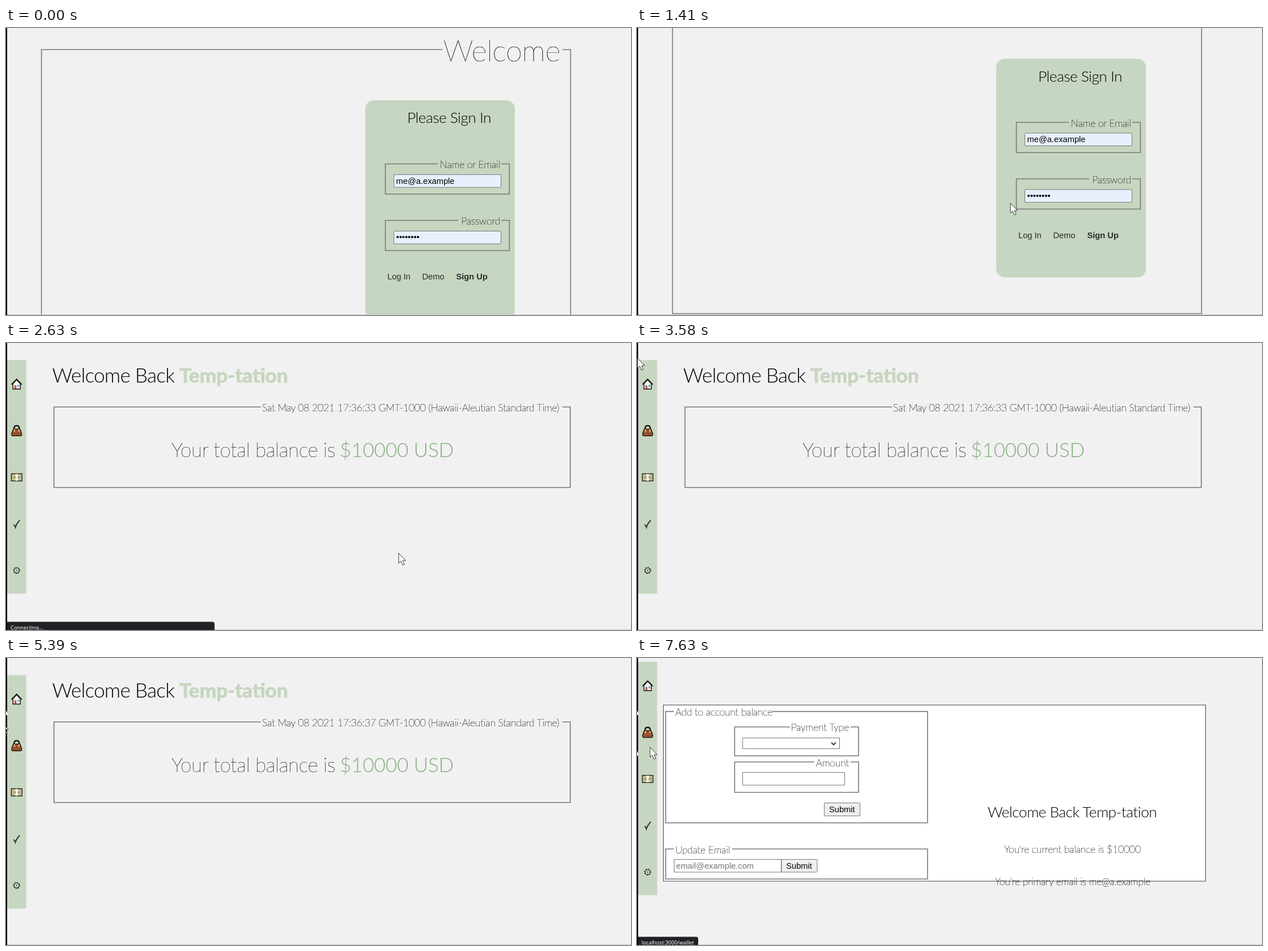
Write an HTML page that moves like this. It is 1103x508 px and loops after 7690 ms.

```html
<!DOCTYPE html>
<html lang="en">
<head>
<meta charset="utf-8">
<title>Account demo</title>
<style>
  html, body { margin: 0; width: 100%; height: 100%; overflow: hidden; background: #f1f1f1; }
  svg { display: block; width: 1103px; height: 508px; }
  .lato { font-family: Lato, sans-serif; }
  .thin { font-weight: 100; letter-spacing: -.0117em; stroke: #000; stroke-width: .2; }
  .light { font-weight: 300; letter-spacing: -.021em; }
  .amount { letter-spacing: -.006em; }
  .ui { font: 14.67px "Liberation Sans", Arial, sans-serif; }
  .bold { font-weight: 700; }
  .status { font: 9.3px "Noto Sans", sans-serif; fill: #fff; }
  .line { fill: none; stroke: #777; stroke-width: 1.6; }
  .control { stroke: #767676; stroke-width: 1; }
</style>
</head>
<body>
<svg id="stage" viewBox="0 0 1103 508" xmlns="http://www.w3.org/2000/svg"></svg>
<script>
const LOOP = 7690, HOME_AT = 2430, RELOAD_AT = 4650, WALLET_AT = 7490;
const EMAIL = "me@a.example";
const NICKNAME = "Temp-tation";

const text = (x, y, str, cls, size, extra = "") =>
  `<text x="${x}" y="${y}" class="${cls}" ${size ? `font-size="${size}"` : ""} ${extra}>${str}</text>`;
const thin = (x, y, str, size = 17.6, anchor = "start") =>
  text(x, y, str, "lato thin", size, `text-anchor="${anchor}"`);
const light = (x, y, str, size, extra) => text(x, y, str, "lato light", size, extra);
const ui = (x, y, str, extra) => text(x, y, str, "ui", 0, extra);
const rect = (x, y, w, h, fill, extra = "") =>
  `<rect x="${x}" y="${y}" width="${w}" height="${h}" fill="${fill}" ${extra}/>`;
const control = (x, y, w, h, fill, r = 1.5) =>
  rect(x + .5, y + .5, w - 1, h - 1, fill, `rx="${r}" class="control"`);
// Box whose top edge is open between gapLeft and gapRight
const fieldset = (left, top, right, bottom, gapLeft, gapRight) =>
  `<path class="line" d="M${gapLeft} ${top}H${left}V${bottom}H${right}V${top}H${gapRight}"/>`;
const group = (id, body, extra = "") => `<g id="${id}" ${extra}>${body}</g>`;

const loginPage = group("login",
  fieldset(62.6, 38.3, 996.4, 579, 770, 982) +
  thin(978, 59, "Welcome", 52.8, "end") +
  rect(634, 128, 264, 387, "#c6d6c0", 'rx="15"') +
  light(782, 168, "Please Sign In", 26.4, 'text-anchor="middle"') +
  fieldset(669.5, 240.5, 888.4, 294, 762, 874) +
  thin(872, 248, "Name or Email", 17.6, "end") +
  control(684, 259, 190, 23.5, "#e8f0fe") +
  ui(688.6, 275.5, EMAIL) +
  fieldset(669.5, 340.5, 888.4, 394, 798, 874) +
  thin(872, 348, "Password", 17.6, "end") +
  control(684, 359, 190, 23.5, "#e8f0fe") +
  ui(688.6, 375.3, "•".repeat(8)) +
  ui(673, 445, "Log In", 'fill="#2a2a2a"') +
  ui(734.5, 445, "Demo", 'fill="#2a2a2a"') +
  text(794.5, 445, "Sign Up", "ui bold", 0, 'fill="#2a2a2a"'));

const homePage = group("home",
  light(81.5, 70, "Welcome Back", 35.2) +
  text(306, 70, NICKNAME, "lato bold", 35.2,
    'fill="#c6d6c0" stroke="#c6d6c0" stroke-linejoin="round"') +
  fieldset(84.6, 113.3, 995.8, 255.8, 450, 982) +
  thin(452, 121, '<tspan id="clock"></tspan>') +
  thin(292, 202, "Your total balance is", 35.2) +
  text(589, 202, "$10000 USD", "lato light amount", 35.2, 'fill="#86ad80"'));

const walletPage = group("wallet",
  rect(46.5, 83.2, 957, 311.8, "#fff", 'stroke="#444"') +
  fieldset(50.6, 94.6, 512.7, 291.7, 65, 239) +
  thin(67.5, 101.5, "Add to account balance") +
  fieldset(172.3, 122, 391, 173.3, 270, 377) +
  thin(374, 129, "Payment Type", 17.6, "end") +
  control(186, 141, 172, 20, "#fff", 0) +
  `<path d="M343 149.5l4 4 4-4" fill="none" stroke="#111" stroke-width="1.6"/>` +
  fieldset(172.3, 184, 391, 237.7, 313, 377) +
  thin(374, 191.5, "Amount", 17.6, "end") +
  control(186, 202, 181, 23.5, "#fff", 0) +
  control(330, 256, 64, 24, "#efefef") + ui(339, 273, "Submit") +
  fieldset(50.6, 338, 512.7, 391.3, 65, 168) +
  thin(67.5, 345.5, "Update Email") +
  control(65, 356, 190, 23.5, "#fff", 0) +
  ui(69, 373, "email@example.com", 'fill="#757575"') +
  control(254.5, 356, 64, 23.5, "#efefef") + ui(263.3, 373, "Submit") +
  light(768, 282, `Welcome Back ${NICKNAME}`, 26.4, 'text-anchor="middle"') +
  thin(768.5, 345, "You're current balance is $10000", 17.6, "middle") +
  thin(769, 401.5, `You're primary email is ${EMAIL}`, 17.6, "middle"));

// Icons are centred on their own origin
const icons = [
  `<path d="M-6.5-1V8.5H6.5V-1L0-8Z" fill="#f6f6f6" stroke="#111" stroke-width="1.4"/>
   <path d="M-9 .5L0-8.7 9 .5" fill="none" stroke="#1b1414" stroke-width="2"/>
   ${rect(-4, 2, 3.5, 6, "#d0523c")}${rect(1.3, 1, 3.5, 3.5, "#55b4e6")}`,
  `<path d="M-4.5-1V-5Q-4-9 0-9T4.5-5V-1" fill="none" stroke="#160c08" stroke-width="2.4"/>
   <path d="M-6-3H6L9 5.5Q9 9 6 9H-6Q-9 9-9 5.5Z" fill="#96502f" stroke="#160c08" stroke-width="1.3"/>
   <path d="M-4-3V2M4-3V2" stroke="#e9b574" stroke-width="2.2"/>`,
  `${rect(-9.3, -6.3, 18.6, 12.6, "#efe5b4", 'stroke="#111" stroke-width="1.4"')}
   ${rect(-7, -4, 14, 8, "none", 'stroke="#8c8861" stroke-width=".8"')}
   ${rect(-2, -6, 4, 12, "#faf8e9")}
   <circle cx="-4" r="1.8" fill="none" stroke="#555"/><circle cx="4" r="1.8" fill="none" stroke="#555"/>`,
  `<path d="M-5.5 1.5Q-3 2.5-2.2 6 0-1 5.5-6.5" fill="none" stroke="#333" stroke-width="2"/>`,
  `<circle r="4.5" fill="none" stroke="#222" stroke-width="1.3"/><circle r="1" fill="#222"/>
   <circle r="5.7" fill="none" stroke="#222" stroke-width="1.3" stroke-dasharray="1.5 2.98"/>`
];

const sidebar = group("sidebar",
  rect(2, 30.3, 33.6, 413.2, "#c6d6c0") +
  rect(2, 54, 35, 35, "#8aab86", 'id="highlight"') +
  icons.map((icon, i) => `<g transform="translate(18.8 ${73 + i * 82.4})">${icon}</g>`).join(""));

const chrome =
  rect(0, 507, 1103, 1, "#c9c9c9") +
  group("status", `<path id="bubble" fill="#202124"/>` +
    `<text id="statusText" class="status" x="8" y="507"></text>`) +
  rect(0, 0, 2, 508, "#000") +
  `<path id="notch1" d="M0 93L3 98V101H0Z" fill="#eee"/>` +
  `<path id="notch2" d="M0 164L2 169V173H0Z" fill="#eee"/>`;

const pointer = group("pointer",
  `<path id="arrow" d="M0 0V17.5L4 14 7 21 10 19.8 7.2 13H12.5Z"/>` +
  `<path id="hand" d="M-1.5 1.5Q0-1 1.5 1.5V7L7 8.5Q8.7 9 8.5 12V14L7 19.5H-2L-5.5 13Q-6.5 10.5-4.5 10.5L-1.5 12.5Z"/>`,
  'fill="#fff" stroke="#222" stroke-width=".9"');

document.getElementById("stage").innerHTML = rect(0, 0, 1103, 508, "#f1f1f1") +
  loginPage + homePage + walletPage + sidebar + chrome + pointer;

// Pointer tip: time, x, y
const moves = [
  [1410, 659, 310], [1670, 659, 310], [2000, 695, 370], [2100, 705, 382], [2230, 693, 372],
  [2960, 693, 372], [3300, 240, 170], [3580, 1, 27], [3650, -2, 20], [3710, -20, 22],
  [3769, -20, 95], [3770, -3, 95], [3950, 40, 130], [4050, 62, 142], [4250, 38, 108],
  [4400, 14, 72], [4450, 14, 67], [5180, 14, 67], [5330, 4, 95], [5430, -16, 125],
  [5550, -3, 152], [5730, 12, 154], [6000, 12, 154], [6140, 19, 164],
  [6690, 19, 164], [7160, 23, 158]
];

const $ = id => document.getElementById(id);
const show = (id, on) => $(id).setAttribute("visibility", on ? "visible" : "hidden");
const place = (id, x, y) => $(id).setAttribute("transform", `translate(${x} ${y})`);
const smooth = p => { p = Math.min(1, Math.max(0, p)); return p * p * (3 - 2 * p); };

function pointerAt(t) {
  const next = moves.findIndex(m => m[0] > t);
  if (next < 0) return moves[moves.length - 1].slice(1);
  if (next === 0) return [-30, 0];
  const [t0, x0, y0] = moves[next - 1], [t1, x1, y1] = moves[next];
  const p = (t - t0) / (t1 - t0);
  return [x0 + (x1 - x0) * p, y0 + (y1 - y0) * p];
}

function statusAt(t) {
  if (t >= 2560 && t < 3030) return ["Connecting...", 368];
  if (t >= 4580 && t < 5300) return ["localhost:3000/", 80];
  if (t >= 5730) return ["localhost:3000/wallet", 108];
  return null;
}

function draw(t) {
  const onWallet = t >= WALLET_AT;
  const onHome = t >= HOME_AT && !onWallet;
  show("login", t < HOME_AT);
  show("home", onHome);
  show("wallet", onWallet);
  show("sidebar", t >= HOME_AT);
  place("login", 0, -73.5 * smooth((t - 470) / 680));
  place("sidebar", 0, onWallet ? -23.7 : 0);
  $("clock").textContent =
    `Sat May 08 2021 17:36:${t < RELOAD_AT ? 33 : 37} GMT-1000 (Hawaii-Aleutian Standard Time)`;

  const [x, y] = pointerAt(t);
  const hovered = onHome && x > 2 && x < 37
    ? [54, 137].find(top => y >= top && y <= top + 35) : undefined;
  const hovering = hovered !== undefined;
  place("pointer", x, y);
  show("arrow", !hovering);
  show("hand", hovering);
  show("highlight", hovering);
  if (hovering) $("highlight").setAttribute("y", hovered);

  const status = statusAt(t);
  show("status", status);
  if (status) {
    $("statusText").textContent = status[0];
    $("bubble").setAttribute("d", `M2 508V493.5H${status[1] - 4}q4 0 4 4V508Z`);
  }
  show("notch1", t >= 3770);
  show("notch2", t >= 5550);
}

const start = performance.now();
function tick() {
  draw((performance.now() - start) % LOOP);
  requestAnimationFrame(tick);
}
tick();
</script>
</body>
</html>
```
